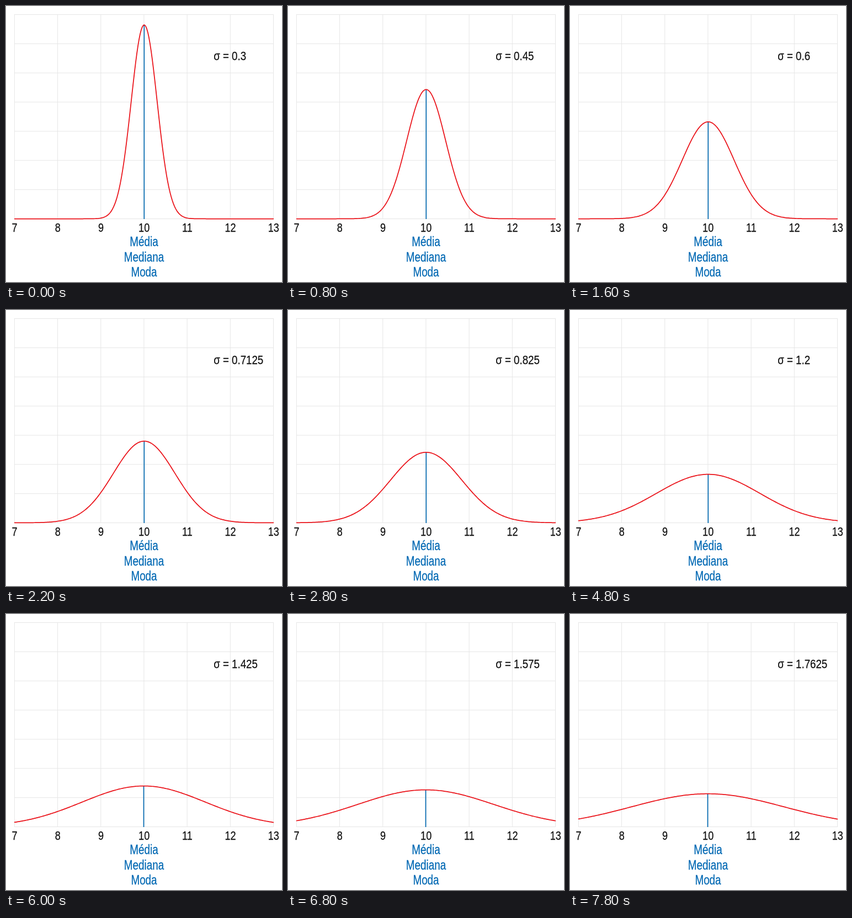
Recreate the animation shown at these times as an HTML page. Size 500 by 500 pixels, loop 8000 ms.

```html
<!DOCTYPE html>
<html lang="pt">
<head>
<meta charset="utf-8">
<title>Curva normal</title>
<style>
  html, body { margin: 0; width: 100%; height: 100%; overflow: hidden; background: #fff; }
  svg { display: block; width: 100%; height: 100%; }
  text { font-family: "Liberation Sans", Arial, sans-serif; stroke-width: 0.25; }
  .grid { stroke: #e6e6e6; stroke-width: 1; fill: none; }
  .curve { stroke: #ea1219; stroke-width: 1.75; fill: none; stroke-linejoin: round; }
  .mean { stroke: #0068b0; stroke-width: 1.7; }
  .tick, .sigma { fill: #111; stroke: #111; }
  .tick { font-size: 22px; text-anchor: middle; }
  .name { font-size: 23px; fill: #0068b3; stroke: #0068b3; text-anchor: middle; }
  .sigma { font-size: 22.8px; }
</style>
</head>
<body>
<svg id="stage" viewBox="0 0 500 500"></svg>
<script>
const LOOP = 8000, STEP = 200;
const LEFT = 15.4, RIGHT = 484.5, TOP = 15.5, BASE = 385.5;
const UNIT = (RIGHT - LEFT) / 6, ROW = (BASE - TOP) / 7;
const AREA = 105.4;      // peak height for sigma = 1
const NARROW = 0.82;     // condensed letterforms
const stage = document.getElementById('stage');

function add(tag, attrs, content = '') {
  const el = document.createElementNS('http://www.w3.org/2000/svg', tag);
  for (const key in attrs) el.setAttribute(key, attrs[key]);
  el.textContent = content;
  return stage.appendChild(el);
}

function label(cls, x, y, content) {
  return add('text', { class: cls, transform: `translate(${x} ${y}) scale(${NARROW} 1)` }, content);
}

const xOf = value => LEFT + (value - 7) * UNIT;

let grid = '';
for (let v = 7; v <= 13; v++) grid += `M${xOf(v)} 15V386`;
for (let r = 0; r <= 7; r++) grid += `M15 ${TOP + r * ROW}H485`;
add('path', { class: 'grid', d: grid });

const mean = add('line', { class: 'mean', y2: 386 });
const curve = add('path', { class: 'curve' });

for (let v = 7; v <= 13; v++) label('tick', xOf(v) + 0.2, 409.2, v);
['Média', 'Mediana', 'Moda'].forEach((name, i) => label('name', 250, 435 + i * 27.5, name));
const sigmaLabel = label('sigma', 376.3, 97.8, '');

function draw(time) {
  const step = Math.floor((time % LOOP) / STEP);
  const sigma = 0.3 + 0.0375 * step;
  const center = sigma > 1.3 ? 249.5 : 250.3;
  const yOf = x => BASE - AREA / sigma * Math.exp(-0.5 * ((x - center) / UNIT / sigma) ** 2);

  const points = [];
  for (let x = 15; x <= 485; x += 2) points.push(`${x} ${yOf(x).toFixed(2)}`);
  curve.setAttribute('d', 'M' + points.join('L'));

  mean.setAttribute('x1', center);
  mean.setAttribute('x2', center);
  mean.setAttribute('y1', yOf(center));
  sigmaLabel.textContent = 'σ = ' + Number(sigma.toFixed(4));
}

const start = performance.now();
function tick() {
  draw(performance.now() - start);
  requestAnimationFrame(tick);
}
tick();
</script>
</body>
</html>
```
